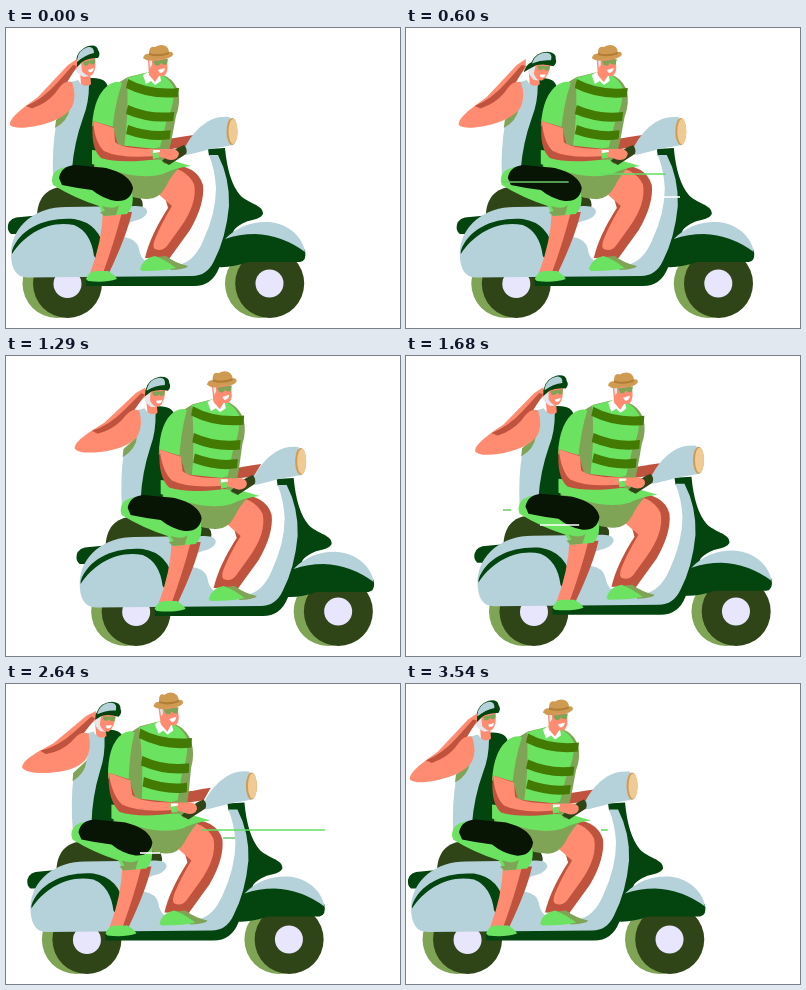
An HTML page for the animation above (3570 ms loop, 394 px wide and 300 px high).

```html
<!DOCTYPE html>
<html lang="en">
<head>
<meta charset="utf-8">
<title>Scooter ride</title>
<style>
  html, body { margin: 0; height: 100%; overflow: hidden; background: #fff; }
  svg { display: block; width: 100vw; height: 100vh; }
  .green { fill: #6be360 } .olive { fill: #7fa455 } .stripe { fill: #437a04 }
  .skin { fill: #ff8b70 } .shade { fill: #c0533d } .blue { fill: #b5d2da }
  .dark { fill: #03440f } .tyre { fill: #2f4417 } .black { fill: #081404 }
  .tan { fill: #cf9b52 } .band { fill: #b27c36 } .lamp { fill: #efca92 }
  .hub { fill: #e8e6fd } .white { fill: #fff } .hair { fill: #e3e6ea }
</style>
</head>
<body>
<svg viewBox="0 0 394 300">
  <g id="ride">
    <g id="wheels">
      <circle class="olive" cx="51" cy="255.5" r="34.5"/>
      <circle class="tyre" cx="61.5" cy="255.5" r="34.5"/>
      <circle class="hub" cx="61.5" cy="256" r="14"/>
      <circle class="olive" cx="253.5" cy="255.5" r="34.5"/>
      <circle class="tyre" cx="263.7" cy="255.5" r="34.5"/>
      <circle class="hub" cx="263.5" cy="255.5" r="14"/>
    </g>
    <g id="body">
      <g id="scooter">
        <path class="tyre" d="M31 187C32 167 44 159 58 159L130 166Q139 172 136 181Z"/>
        <path class="dark" d="M2 197Q4 189 15 189L36 187 30 206 5 206Q1 203 2 197Z"/>
        <path class="dark" d="M202 121 219 120Q222 153 234 167C241 175 258 177 257 186C253 194 240 189 228 202Q220 225 213 240Q206 258 188 258L80 258 80 246 180 246Q202 244 211 218Q221 188 218 160Q215 140 208 128L203 128Z"/>
        <path class="blue" d="M5 225C6 197 30 179 60 179L130 178Q142 178 141 185Q138 191 128 193C112 198 111 207 118 209Q131 211 133 221Q135 236 152 237L172 237Q188 234 197 213Q210 185 210 160Q209 142 203 127L212 127Q224 150 223 178Q220 210 208 233Q201 248 186 248L22 249.500Q5 250 5 225Z"/>
        <path class="dark" d="M6 223C14 200 40 189 68 191Q94 195 99 224L94 236 88 228Q85 204 68 197C42 192 19 206 6 226Z"/>
        <path class="dark" d="M211 239Q211 220 222 209Q268 196 299 222Q301 233 294 234L242 234Q226 240 211 239Z"/>
        <path class="blue" d="M219 211C231 198 248 193 263 194C284 196 297 210 299 224Q276 207 249 206Q233 206 219 211Z"/>
      </g>
      <g id="passenger">
        <path class="dark" d="M84 50Q101 49 102 60L90 90 92 140 64 141 74 82Z"/>
        <path class="skin" d="M74 43 84 43 85 56Q81 61 75 57Z"/>
        <path class="blue" d="M65 54 72 52Q77 60 83 57Q83 75 77 90Q68 115 66 141L47 149Q46 120 50 97Q63 88 66 72Z"/>
        <path class="olive" d="M50 92 64 80Q62 93 49 100Z"/>
        <g id="head">
          <path class="hair" d="M69 37Q69 46 77 47L82 34Z"/>
          <path class="skin" d="M75 33 89 28Q91 42 86 47Q80 49 76 44Z"/>
          <path class="hair" d="M74 40Q77 46 83 48L78 49Q71 46 71 41Z"/>
          <path class="olive" d="M77 34 89 31 89 35Q86 38 84 35Q81 39 78 37Z"/>
          <path class="white" d="M82 42 88 40Q87 45 83 44Z"/>
          <path class="dark" d="M66 45Q65 38 70 33Q71 22 82 18Q91 16 92 22Q95 26 92 30Q82 30 76 34Q70 40 66 45Z"/>
          <path class="blue" d="M71 32Q72 22 82 19Q88 18 88 25Q79 27 71 34Z"/>
        </g>
        <g id="arm">
          <path class="skin" d="M4 97C3 89 20 78 32 69L62 37 71 31 71 40 50 64 22 90Z"/>
          <path class="shade" d="M71 38 67 37Q60 45 51 55Q37 71 20 78L30 82Q46 74 57 61Z"/>
          <path class="skin" d="M66 54Q71 68 66 79Q58 92 30 98Q9 102 4 97Q7 88 34 77Q46 71 53 60Q59 52 66 54Z"/>
        </g>
      </g>
      <g id="legs">
        <path class="shade" d="M150 137Q190 133 197 157Q199 176 184 202L163 231 139 230Q144 208 162 180Z"/>
        <path class="skin" d="M146 139Q178 136 188 156Q192 175 174 200L161 218Q156 224 149 221Q146 219 149 211Q155 196 166 178L150 164Z"/>
        <path class="olive" d="M150 229 160 228Q169 235 182 238Q181 241 165 242Z"/>
        <path class="green" d="M134 241Q137 230 149 228Q158 231 170 240Q160 243 136 243Z"/>
        <path class="olive" d="M88 128 165 134 174 139Q166 146 159 160Q152 172 140 171Q118 171 88 146Z"/>
        <path class="green" d="M86 122 158 130 185 138Q168 140 157 146Q140 151 116 145L86 136Z"/>
      </g>
      <g id="rider">
        <path class="shade" d="M156 112Q174 109 188 107L180 119 158 122Z"/>
        <path class="olive" d="M100 62 122 49 143 44Q166 45 172 63Q175 75 170 88Q166 112 160 136L93 132Z"/>
        <path class="green" d="M121 50 143 44Q161 45 168 60Q169 75 160 95L154 119Q135 125 118 120Q123 85 121 50Z"/>
        <g id="stripes"></g>
        <path class="green" d="M86 98Q88 66 104 56Q112 52 116 55Q109 75 106 104Z"/>
        <path class="green" d="M92 126 155 132 160 138 89 139Z"/>
        <path class="white" d="M137 47 142 44 148 52 154 47 155 53 149 57 145 53 140 56Z"/>
        <path class="skin" d="M142 32 160 29Q164 43 158 48L153 48 149 54 143 47Z"/>
        <path class="hair" d="M143 31 146 31 146 37 144 40Z"/>
        <path class="olive" d="M147 33 162 31 161 36Q158 38 155 35Q153 39 149 37Z"/>
        <path class="white" d="M152 42 159 40Q158 45 154 45Z"/>
        <path class="tan" d="M137 30Q139 25 143 26Q143 17 149 19Q156 15 161 19Q163 21 163 24Q167 23 167 27Q163 32 153 31Q142 35 137 30Z"/>
        <path class="band" d="M143 25Q153 28 163 24L163 26Q153 30 143 27Z"/>
      </g>
      <g id="steering">
        <path class="blue" d="M179 119Q188 102 201 94Q210 88 224 89L227 117 204 121Q190 125 180 127Z"/>
        <ellipse class="tan" cx="226" cy="103.500" rx="5.500" ry="13.500"/>
        <ellipse class="lamp" cx="227" cy="103.500" rx="4.500" ry="12.500"/>
        <path class="tyre" d="M156 133Q167 121 178 117Q182 121 180 126L163 137Z"/>
      </g>
      <g id="rider-arm">
        <path class="shade" d="M87 93 107 99 112 117 150 121 152 131Q114 136 95 130Q84 120 87 93Z"/>
        <path class="skin" d="M87 93 108 100 109 114Q116 121 148 121L168 121Q176 124 171 130Q166 134 158 130L150 128Q114 131 98 123Q89 115 87 93Z"/>
        <path class="green" d="M146 122 152 122 153 130 147 131Z"/>
        <path class="white" d="M147 122 154 122 154 124 147 125Z"/>
      </g>
      <g id="passenger-legs">
        <path class="shade" d="M105 184 126 184Q121 207 103 245L93 245Z"/>
        <path class="skin" d="M97 183 116 184Q109 212 97 245L84 245Q96 214 97 183Z"/>
        <path class="green" d="M46 153Q46 141 60 139L126 164Q129 178 121 186L98 188 93 178Q68 170 47 157Z"/>
        <path class="olive" d="M96 178Q108 182 113 177L110 187 98 188 94 184 99 183Z"/>
        <path class="black" d="M53 150Q55 138 69 137L100 140Q124 146 127 160Q125 174 110 173Q97 171 86 162Q70 160 56 157Z"/>
        <path class="green" d="M80 251Q83 243 90 243L102 243Q109 247 111 251Q99 255 82 253Z"/>
      </g>
    </g>
  </g>
  <g id="lines"></g>
</svg>
<script>
const LOOP = 3570, BOUNCE = 595, STREAK = 415;
const $ = id => document.getElementById(id);
const clamp = v => Math.max(0, Math.min(1, v));
const place = (id, transform) => $(id).setAttribute('transform', transform);

function add(parent, tag, attrs) {
  const node = document.createElementNS('http://www.w3.org/2000/svg', tag);
  for (const key in attrs) node.setAttribute(key, attrs[key]);
  return $(parent).appendChild(node);
}

// Smooth curve through [time, value] pairs, at rest on both ends.
function spline(keys, t) {
  let i = 0;
  while (i < keys.length - 2 && t > keys[i + 1][0]) i++;
  const slope = k => k < 1 || k > keys.length - 2 ? 0 :
    (keys[k + 1][1] - keys[k - 1][1]) / (keys[k + 1][0] - keys[k - 1][0]);
  const [t0, a] = keys[i], [t1, b] = keys[i + 1];
  const d = t1 - t0, u = (t - t0) / d, w = 1 - u;
  return a * (1 + 2 * u) * w * w + b * (3 - 2 * u) * u * u +
    d * u * w * (slope(i) * w - slope(i + 1) * u);
}

const drive = [[0, 0], [330, 21.5], [540, 44.5], [900, 63.5], [1380, 69], [1680, 66.5],
  [2160, 54.5], [2280, 48], [2640, 19.5], [2760, 11], [3240, 3.5], [3570, 0]];
const nod = [[0, 0], [330, 20], [495, 19], [855, 17], [1000, 14], [1680, 6], [1785, 0]];
const rattle = [[0, 0], [60, 2], [195, 0.6], [262, -1.5], [297.5, 0]];

for (const y of [51, 77, 97]) {
  const right = 173 - (y - 51) * 0.18, drop = 9 - (y - 51) * 0.08;
  add('stripes', 'path', { class: 'stripe',
    d: `M122 ${y}Q144 ${y + drop + 3} ${right} ${y + drop}L${right - 1} ${y + drop + 9}Q144 ${y + drop + 12} 120 ${y + 9}Z` });
}

const streaks = [
  { y: 105.5, from: 287, to: 163, color: '#86b983', width: 1.5, starts: [160] },
  { y: 146, from: 338, to: 195, color: '#62de62', width: 1.6, starts: [307, 2450, 3146] },
  { y: 154, from: 229, to: 97, color: '#6cc96a', width: 1.5, starts: [318, 1290, 2624] },
  { y: 169, from: 274, to: 134, color: '#fff', width: 1.6, starts: [564, 1344, 2270] }
];
for (const s of streaks)
  s.node = add('lines', 'line', { y1: s.y, y2: s.y, stroke: s.color, 'stroke-width': s.width });

function drawStreak({ node, from, to, starts }, t) {
  const start = starts.find(s => t >= s && t < s + STREAK);
  const u = start === undefined ? 0 : (t - start) / STREAK;
  const at = v => from + (to - from) * clamp(v);
  node.setAttribute('x1', at(u * 2.2));
  node.setAttribute('x2', at((u - 0.38) / 0.6));
}

function draw(t) {
  const p = t % BOUNCE;
  const lean = p < 200 ? (1 - Math.cos(Math.PI * p / 200)) / 2
                       : (1 + Math.cos(Math.PI * (p - 200) / 395)) / 2;
  const angle = spline(nod, t % 1785);
  const tilt = (id, skew, stretch) => place(id,
    `translate(0 140) matrix(1 0 ${skew * lean} ${1 + stretch * lean} 0 0) translate(0 -140)`);

  place('ride', `translate(${spline(drive, t)} 0)`);
  place('body', `translate(0 ${spline(rattle, t % (BOUNCE / 2))})`);
  tilt('rider', 0.087, 0.06);
  tilt('rider-arm', 0.087, 0.06);
  tilt('passenger', 0.05, 0.035);
  place('arm', `rotate(${9.5 * lean} 66 62)`);
  place('head', `translate(0 ${angle * 0.2}) rotate(${angle} 81 52)`);
  streaks.forEach(s => drawStreak(s, t));
}

function tick() {
  draw(performance.now() % LOOP);
  requestAnimationFrame(tick);
}
tick();
</script>
</body>
</html>
```
